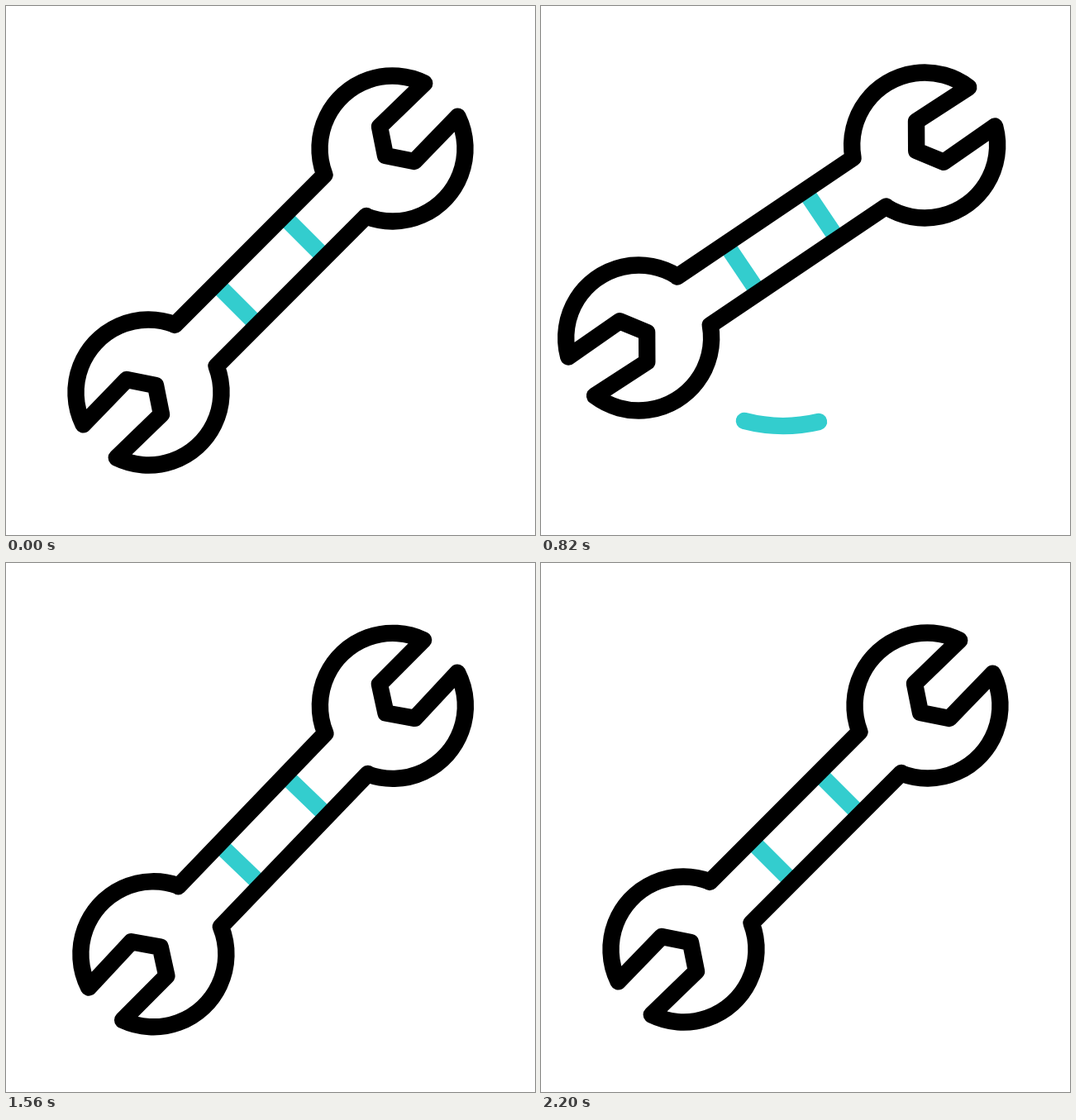
An HTML page with a canvas that plays this animation: 640x640 px, repeating every 2400 ms.

```html
<!DOCTYPE html>
<html lang="en">
<head>
<meta charset="utf-8">
<title>Wrench</title>
<style>
  html, body { margin: 0; width: 100%; height: 100%; overflow: hidden; background: #fff; }
  canvas { display: block; width: 100vmin; height: 100vmin; }
</style>
</head>
<body>
<canvas id="stage" width="640" height="640"></canvas>
<script>
const ctx = document.getElementById('stage').getContext('2d');
const LOOP = 2400, STEP = 20, SWING_END = 2200;
const BLACK = '#000', CYAN = '#33cdce', WHITE = '#fff';
const PIVOT = { x: 486.7, y: 153.3 };
const HEAD = { x: 147.5, y: -147.5, r: 88 };
const LINE = 20.4, BAR_OFFSET = 40.8;

// [time in ms, angle in degrees]
const SWING = [[0, 0], [515, -15], [910, 15], [1348, -14.7], [1750, 10.5], [SWING_END, 0]];

// Arcs left behind by the moving head; angles in degrees, times in ms
const TRAILS = [
  { x: 392, y: 296, r: 228, from: 163.2, to: 130, grow: [50, 300], shrink: [360, 520] },
  { x: 293, y: 321, r: 187, from: 76.7, to: 104.6, grow: [540, 760], shrink: [820, 950] }
];

const rad = deg => deg * Math.PI / 180;
const mix = (a, b, u) => a + (b - a) * u;
const progress = (t, [a, b]) => Math.min(1, Math.max(0, (t - a) / (b - a)));
const smooth = u => u * u * (3 - 2 * u);

function swingAngle(t) {
  for (let i = 1; i < SWING.length; i++) {
    const [t0, a0] = SWING[i - 1], [t1, a1] = SWING[i];
    if (t <= t1) return mix(a0, a1, smooth((t - t0) / (t1 - t0)));
  }
  return 0;
}

function headArc(path, x0, y0, x1, y1) {
  const angle = (x, y) => Math.atan2(y - HEAD.y, x - HEAD.x);
  path.arc(HEAD.x, HEAD.y, HEAD.r, angle(x0, y0), angle(x1, y1), true);
}

// Both ends are the same half, turned by 180 degrees
function wrenchOutline() {
  const half = new Path2D();
  headArc(half, 116, -66, 226, -186);
  half.lineTo(174, -132);
  half.lineTo(139, -139);
  half.lineTo(132, -174);
  headArc(half, 186, -226, 66, -116);
  half.lineTo(-116, 66);

  const whole = new Path2D(half);
  whole.addPath(half, new DOMMatrix([-1, 0, 0, -1, 0, 0]));
  return whole;
}

const OUTLINE = wrenchOutline();

function drawBar(offset) {
  ctx.beginPath();
  ctx.moveTo(offset - 25, -offset - 25);
  ctx.lineTo(offset + 25, -offset + 25);
  ctx.stroke();
}

function drawWrench(angle) {
  ctx.save();
  ctx.translate(PIVOT.x, PIVOT.y);
  ctx.rotate(rad(angle));
  ctx.translate(320 - PIVOT.x, 320 - PIVOT.y);

  ctx.fillStyle = WHITE;
  ctx.fill(OUTLINE);
  ctx.fillRect(0, 0, 0, 0);

  // The shaft lies between the two halves
  ctx.beginPath();
  ctx.moveTo(66, -116);
  ctx.lineTo(116, -66);
  ctx.lineTo(-66, 116);
  ctx.lineTo(-116, 66);
  ctx.fill();

  ctx.strokeStyle = CYAN;
  ctx.lineCap = 'butt';
  drawBar(BAR_OFFSET);
  drawBar(-BAR_OFFSET);

  ctx.strokeStyle = BLACK;
  ctx.lineCap = 'round';
  ctx.stroke(OUTLINE);
  ctx.restore();
}

function drawTrail(trail, t) {
  const lead = smooth(progress(t, trail.grow));
  const tail = smooth(progress(t, trail.shrink));
  if (lead <= tail) return;
  const start = rad(mix(trail.from, trail.to, tail));
  const end = rad(mix(trail.from, trail.to, lead));
  ctx.beginPath();
  ctx.arc(trail.x, trail.y, trail.r, start, end, end < start);
  ctx.strokeStyle = CYAN;
  ctx.lineCap = 'round';
  ctx.stroke();
}

function render(now) {
  const t = Math.min(SWING_END, Math.floor((now % LOOP) / STEP) * STEP);
  ctx.fillStyle = WHITE;
  ctx.fillRect(0, 0, 640, 640);
  ctx.lineWidth = LINE;
  ctx.lineJoin = 'round';
  TRAILS.forEach(trail => drawTrail(trail, t));
  drawWrench(swingAngle(t));
}

let origin = null;
function tick(now) {
  if (origin === null) origin = now;
  render(now - origin);
  requestAnimationFrame(tick);
}
render(0);
requestAnimationFrame(tick);
</script>
</body>
</html>
```
